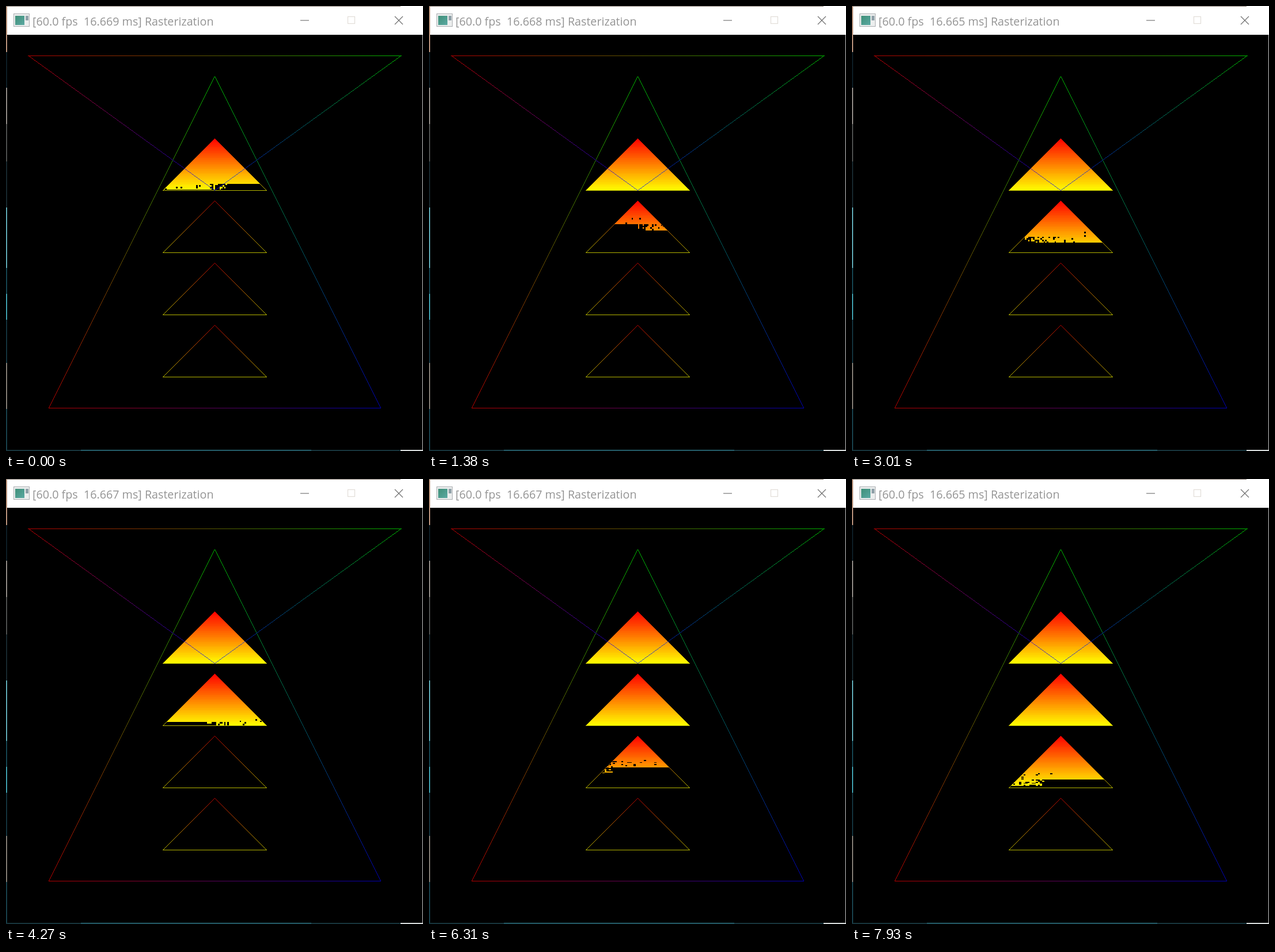
These frames come from a looping animation (724 by 773 pixels, 8000 ms). An HTML page with a canvas:

```html
<!DOCTYPE html>
<html lang="en">
<head>
<meta charset="utf-8">
<title>Rasterization</title>
<style>
html, body { margin: 0; width: 100%; height: 100%; overflow: hidden; background: #000; }
canvas { display: block; width: 724px; height: 773px; }
</style>
</head>
<body>
<canvas id="stage" width="724" height="773"></canvas>
<script>
const W = 724, H = 773, LOOP = 8000;
const ctx = document.getElementById('stage').getContext('2d');

// The drawing area is a square with its origin at the left top corner
const VIEW = { x: 2, y: 50, size: 721 };
const px = u => VIEW.x + u * VIEW.size;
const py = v => VIEW.y + v * VIEW.size;

const RED = [255, 0, 0], GREEN = [0, 255, 0], BLUE = [0, 0, 255], YELLOW = [255, 255, 0];
const LINE_ALPHA = 0.7;
const UNIT = VIEW.size / 200, STRIP = 3 * UNIT;
const CX = px(0.5), DEPTH = VIEW.size / 8, AREA = DEPTH * DEPTH;
const topV = i => 0.25 + 0.15 * i;

// Size of a cell, depth of the first strip, and which strips run rightwards
const FILLS = [
  { cw: 0.75 * UNIT, ch: 0.75 * UNIT, first: UNIT, odd: 0 },
  { cw: 0.75 * UNIT, ch: 0.75 * UNIT, first: 2 * UNIT, odd: 1 },
  { cw: UNIT, ch: 0.5 * UNIT, first: 3 * UNIT, odd: 1 }
];

// Time in ms, covered area in square pixels
const PROGRESS = [
  [0, 7465], [1380, 10220], [3010, 13250], [4270, 15802],
  [5270, 17745], [6310, 19437], [8000, 22750]
];
// Last digits of the frame time; they change once a second
const FRAME_MS = ['669', '667', '668', '665', '666', '667', '671', '667', '665'];
const FIRST_TICK = 270;

const lerp = (a, b, k) => a + (b - a) * k;
const rgb = c => `rgb(${c.map(Math.round).join()})`;

function layer(draw) {
  const c = document.createElement('canvas');
  c.width = W;
  c.height = H;
  draw(c.getContext('2d'));
  return c;
}

function rect(g, color, x, y, w, h) {
  g.fillStyle = color;
  g.fillRect(x, y, w, h);
}

// Hard-edged line of single pixels with a blended colour
function pixelLine(g, [u0, v0, c0], [u1, v1, c1]) {
  const n = Math.floor(Math.max(Math.abs(u1 - u0), Math.abs(v1 - v0)) * VIEW.size);
  for (let i = 0; i <= n; i++) {
    const k = i / n;
    rect(g, rgb(c0.map((c, j) => lerp(c, c1[j], k))),
      Math.floor(px(lerp(u0, u1, k))), Math.floor(py(lerp(v0, v1, k))), 1, 1);
  }
}

function outline(g, a, b, c) {
  pixelLine(g, a, b);
  pixelLine(g, b, c);
  pixelLine(g, c, a);
}

function strokePath(g, color, lines) {
  g.strokeStyle = color;
  g.lineWidth = 1.2;
  g.beginPath();
  for (const [x0, y0, x1, y1] of lines) {
    g.moveTo(x0, y0);
    g.lineTo(x1, y1);
  }
  g.stroke();
}

function drawDesktop(g) {
  const bands = [
    [0, '#b58f78'], [80, '#0d1c24'], [142, '#8a8580'], [205, '#4a4c4b'], [270, '#16262c'],
    [350, '#5ba3ae'], [455, '#14424e'], [500, '#3c98a6'], [545, '#12313a'],
    [620, '#7d7770'], [700, '#173f4a']
  ];
  bands.forEach(([y, color], i) => {
    const end = i + 1 < bands.length ? bands[i + 1][0] : H;
    rect(g, color, 0, y, 2, end - y);
  });
  rect(g, '#17343c', 0, 771, W, 2);
  rect(g, '#2f7f90', 130, 771, 400, 1);
  rect(g, '#d8dcdc', 685, 771, 39, 2);
}

function drawWindow(g) {
  drawDesktop(g);
  rect(g, '#fff', 2, 0, W - 2, 50);
  rect(g, '#85796f', 0, 0, 685, 1);
  rect(g, '#c9c9c9', 723, 50, 1, 721);
  rect(g, '#000', VIEW.x, VIEW.y, VIEW.size, VIEW.size);

  rect(g, '#a9adb0', 13, 13, 28, 23);
  rect(g, '#eceeee', 14, 14, 26, 21);
  const teal = g.createLinearGradient(16, 17, 32, 34);
  teal.addColorStop(0, '#3f8f78');
  teal.addColorStop(1, '#5caaa4');
  rect(g, teal, 16, 17, 16, 16);
  rect(g, '#8fa0a8', 34, 17, 5, 8);

  strokePath(g, '#777', [[511, 25, 526, 25]]);
  g.strokeStyle = '#e2ddd8';
  g.strokeRect(593.5, 18.5, 12, 12);
  strokePath(g, '#707070', [[675, 18, 689, 32], [689, 18, 675, 32]]);
}

function drawSmallOutlines(g) {
  for (let i = 0; i < 4; i++) {
    const v = topV(i);
    outline(g, [0.5, v, RED], [0.375, v + 0.125, YELLOW], [0.625, v + 0.125, YELLOW]);
  }
}

function drawLargeOutlines(g) {
  outline(g, [0.5, 0.1, GREEN], [0.1, 0.9, RED], [0.9, 0.9, BLUE]);
  outline(g, [0.05, 0.05, RED], [0.95, 0.05, GREEN], [0.5, 0.375, BLUE]);
}

function random(i, j, k) {
  const v = Math.sin(i * 127.1 + j * 311.7 + k * 74.7 + 5.3) * 43758.5453;
  return v - Math.floor(v);
}

// Most cells lag a little behind the sweep, a few lag far
function lag(i, j, k) {
  if (random(i + 9, j, k + 3) < 0.006) return lerp(900, 2300, random(i, j + 5, k));
  return Math.min(1600, -270 * Math.log(1 - random(i, j, k)));
}

function makeCells({ cw, ch, first, odd }, index) {
  const cells = [], top = py(topV(index));
  const rows = Math.ceil(DEPTH / ch - 0.01);
  for (let r = 0; r < rows; r++) {
    const mid = (r + 0.5) * ch;
    const strip = mid < first ? 0 : 1 + Math.floor((mid - first) / STRIP);
    const d1 = Math.min(DEPTH, first + strip * STRIP);
    const d0 = strip ? first + (strip - 1) * STRIP : 0;
    const y = Math.round(top + r * ch);
    const h = Math.round(top + (r + 1) * ch) - y;
    const color = rgb([255, 255 * Math.min(1, mid / DEPTH), 0]);
    const reach = Math.ceil((r + 1) * ch / cw) + 1;
    for (let c = -reach; c < reach; c++) {
      const x = Math.round(CX + c * cw);
      const w = Math.round(CX + (c + 1) * cw) - x;
      let k = Math.min(1, Math.max(0, ((c + 0.5) * cw + d1) / (2 * d1)));
      if (strip % 2 !== odd) k = 1 - k;
      const due = index * AREA + lerp(d0 * d0, d1 * d1, k) + lag(c, r, index);
      cells.push({ x, y, w, h, color, due });
    }
  }
  return cells;
}

function progressAt(t) {
  let i = 1;
  while (t > PROGRESS[i][0]) i++;
  const [t0, p0] = PROGRESS[i - 1], [t1, p1] = PROGRESS[i];
  return lerp(p0, p1, (t - t0) / (t1 - t0));
}

const back = layer(drawWindow);
const smallOutlines = layer(drawSmallOutlines);
const largeOutlines = layer(drawLargeOutlines);
const fills = FILLS.map(makeCells);

function drawLines(lines) {
  ctx.globalAlpha = LINE_ALPHA;
  ctx.drawImage(lines, 0, 0);
  ctx.globalAlpha = 1;
}

function drawFill(cells, index, done) {
  const y = py(topV(index)), base = Math.floor(y + DEPTH);
  ctx.save();
  ctx.beginPath();
  ctx.moveTo(CX, y);
  ctx.lineTo(CX + base - y, base);
  ctx.lineTo(CX - base + y, base);
  ctx.clip();
  for (const c of cells) {
    if (c.due < done) rect(ctx, c.color, c.x, c.y, c.w, c.h);
  }
  ctx.restore();
}

function drawTitle(t) {
  const tick = Math.floor((t - FIRST_TICK) / 1000) + 1;
  ctx.font = '19.7px "Open Sans", "Noto Sans", sans-serif';
  ctx.fillStyle = '#949494';
  ctx.fillText(`[60.0 fps  16.${FRAME_MS[tick]} ms] Rasterization`, 46, 33.5);
}

function render(now) {
  const t = now % LOOP, done = progressAt(t);
  ctx.drawImage(back, 0, 0);
  drawTitle(t);
  drawLines(smallOutlines);
  fills.forEach((cells, i) => drawFill(cells, i, done));
  drawLines(largeOutlines);
}

const start = performance.now();
function loop() {
  render(performance.now() - start);
  requestAnimationFrame(loop);
}
loop();
</script>
</body>
</html>
```
